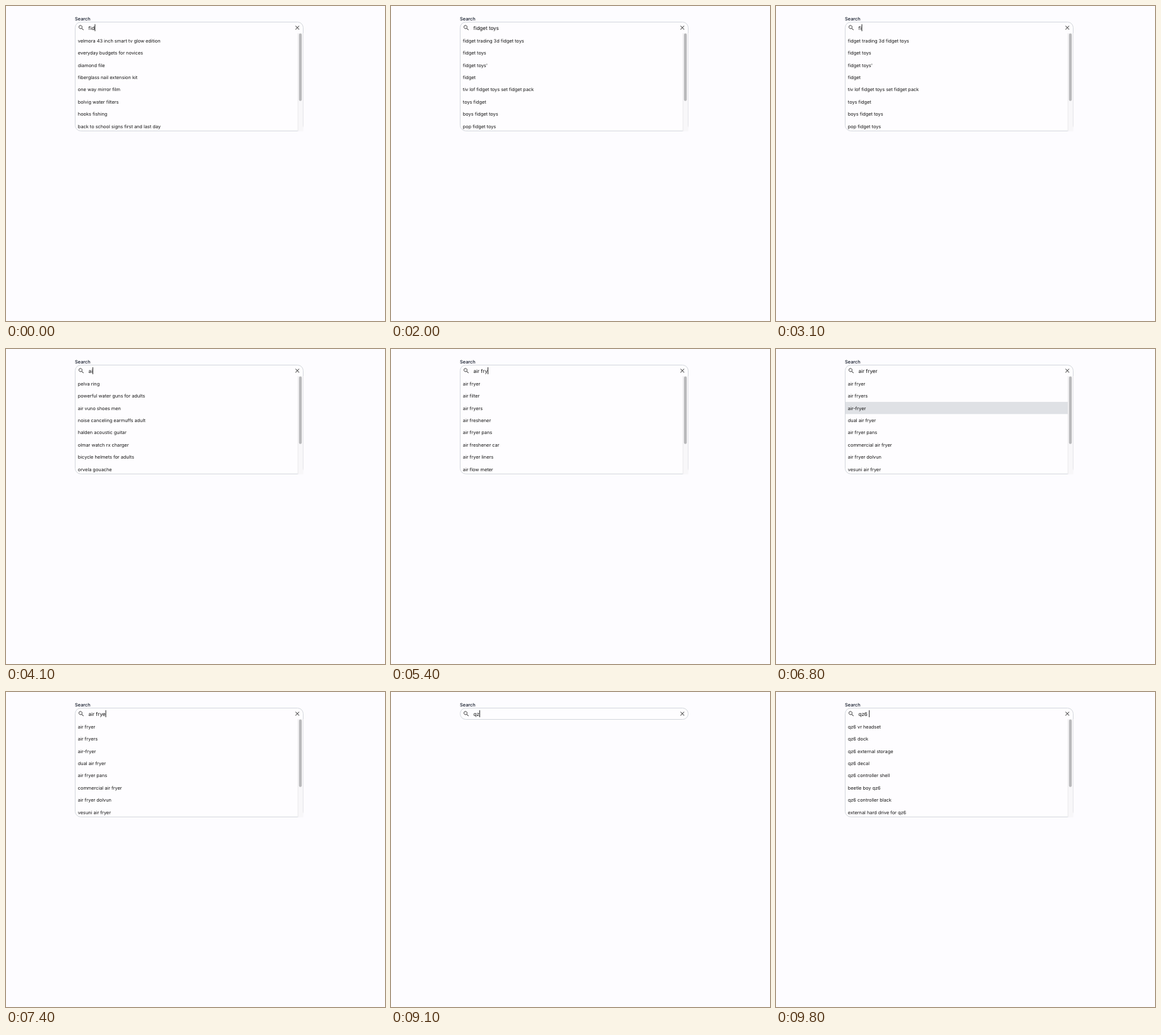
An HTML page for the animation above (10000 ms loop, 600x500 px).

```html
<!DOCTYPE html>
<html lang="en">
<head>
<meta charset="utf-8">
<title>Search suggestions</title>
<style>
  html, body { margin: 0; width: 100%; height: 100%; overflow: hidden; background: #fdfcff; }
  svg { display: block; width: 600px; height: 500px; }
  text { font: 400 7.37px Inter, sans-serif; fill: #151515; white-space: pre; text-rendering: geometricPrecision; }
  #label { font-weight: 500; fill: #111827; }
  #query { font-size: 8.06px; fill: #0c0c0c; }
  .icon { fill: #4a4a4a; }
</style>
</head>
<body>
<svg viewBox="0 0 600 500">
  <defs><clipPath id="inside"><rect x="110" y="44" width="352" height="154"/></clipPath></defs>
  <text id="label" x="109" y="23.2">Search</text>
  <rect id="box" x="109.5" y="25.5" width="361" height="18" rx="9" fill="#fefdff" stroke="#cfd3d9" stroke-width=".9"/>
  <g id="panel">
    <g clip-path="url(#inside)">
      <rect id="highlight" x="110" width="352" height="19.36" fill="#dfe1e5"/>
      <g id="rows"></g>
    </g>
    <rect x="462" y="43" width="8.6" height="155.8" fill="#f8f7f9"/>
    <path d="M462.2 43V198.5M470.4 43V191" stroke="#e3e3e6" stroke-width=".6"/>
    <rect x="463.8" y="43.5" width="4.4" height="107.3" rx="2.2" fill="#b9b9bb"/>
  </g>
  <path class="icon" transform="translate(113.6 29) scale(.4607)" d="M15.5 14h-.79l-.28-.27A6.5 6.5 0 1 0 13.73 14.43l.27.28v.79l5 4.99L20.49 19zM9.5 14A4.5 4.5 0 1 1 9.5 5A4.5 4.5 0 1 1 9.5 14z" fill-rule="evenodd"/>
  <path id="clear" class="icon" transform="translate(455.7 28.9) scale(.4607)" d="M19 6.41L17.59 5 12 10.59 6.41 5 5 6.41 10.59 12 5 17.59 6.41 19 12 13.41 17.59 19 19 17.59 13.41 12z"/>
  <text id="query" x="130.5" y="37.5"></text>
  <rect id="caret" y="29" width=".9" height="11" fill="#111"/>
</svg>
<script>
const LOOP = 10000, BLINK = 500, PITCH = 19.36;
const $ = id => document.getElementById(id);

const lists = {
  fid: ['velmora 43 inch smart tv glow edition', 'everyday budgets for novices', 'diamond file',
    'fiberglass nail extension kit', 'one way mirror film', 'bolvig water filters', 'hooks fishing',
    'back to school signs first and last day'],
  toys: ['fidget trading 3d fidget toys', 'fidget toys', "fidget toys'", 'fidget',
    'tiv lof fidget toys set fidget pack', 'toys fidget', 'boys fidget toys', 'pop fidget toys'],
  a: ['pelva ring', 'powerful water guns for adults', 'air vuno shoes men', 'noise canceling earmuffs adult',
    'halden acoustic guitar', 'olmar watch rx charger', 'bicycle helmets for adults', 'orvela gouache'],
  air: ['air mattress', 'air purifier', 'air fryer', 'air pump', 'air conditioner', 'air freshener',
    'air hockey table', 'air compressor tank'],
  airf: ['air fryer', 'air filter', 'air fryers', 'air freshener', 'air fryer pans', 'air freshener car',
    'air fryer liners', 'air flow meter'],
  fryer: ['air fryer', 'air fryers', 'air-fryer', 'dual air fryer', 'air fryer pans', 'commercial air fryer',
    'air fryer dolvun', 'vesuni air fryer'],
  console: ['qz6 vr headset', 'qz6 dock', 'qz6 external storage', 'qz6 decal', 'qz6 controller shell',
    'beetle boy qz6', 'qz6 controller black', 'external hard drive for qz6']
};
lists.fidget = [...lists.toys].sort();

// time, typed text, suggestion list, highlighted row
const steps = [
  [0, 'fid', 'fid'], [200, 'fidg', 'fid'], [400, 'fidge', 'fid'], [500, 'fidget', 'fid'],
  [800, 'fidget', 'fidget'], [1000, 'fidget ', 'fidget'],
  [1300, 'fidget t', 'fidget'], [1400, 'fidget toy', 'fidget'], [1500, 'fidget toys', 'fidget'],
  [1600, 'fidget toys', 'toys'],
  [2500, 'fidget toy', 'toys'], [2600, 'fidget to', 'toys'], [2700, 'fidget ', 'toys'],
  [2800, 'fidget', 'toys'], [2900, 'fidg', 'toys'], [3000, 'fi', 'toys'], [3200, ''],
  [3700, 'a'], [3900, 'ai'], [4100, 'ai', 'a'], [4200, 'air', 'a'], [4400, 'air ', 'a'], [4600, 'air ', 'air'],
  [4800, 'air f', 'air'], [4900, 'air fr', 'airf'],
  [5400, 'air fry', 'airf'], [5700, 'air fry', 'fryer'], [5800, 'air frye', 'fryer'], [6000, 'air fryer', 'fryer'],
  [6500, 'air fryer', 'fryer', 0], [6600, 'air fryer', 'fryer', 1],
  [6800, 'air fryer', 'fryer', 2], [7100, 'air fryer', 'fryer', 3],
  [7400, 'air frye', 'fryer'], [7500, 'air fry', 'fryer'], [7600, 'air fr', 'fryer'],
  [7700, 'air f', 'fryer'], [7800, 'air ', 'airf'], [8000, 'air', 'air'], [8300, 'a', 'a'], [8400, ''],
  [8800, 'q'], [9100, 'qz'], [9200, 'qz6'], [9300, 'qz6', 'console'], [9800, 'qz6 ', 'console']
];

const rows = lists.fid.map((_, i) => {
  const row = document.createElementNS('http://www.w3.org/2000/svg', 'text');
  row.setAttribute('x', 113.8);
  row.setAttribute('y', 58 + i * PITCH);
  return $('rows').appendChild(row);
});
const show = (id, on) => $(id).setAttribute('visibility', on ? 'visible' : 'hidden');

let shown = -1;
function showStep(index) {
  const [, typed, list, row] = steps[index];
  $('query').textContent = typed;
  $('caret').setAttribute('x', 130.6 + (typed ? $('query').getComputedTextLength() : 0));
  $('panel').style.display = list ? '' : 'none';
  $('box').setAttribute('height', list ? 172.8 : 18);
  if (list) rows.forEach((el, i) => el.textContent = lists[list][i]);
  show('highlight', row !== undefined);
  $('highlight').setAttribute('y', 45.2 + (row || 0) * PITCH);
  show('clear', typed);
}

function draw() {
  const t = performance.now() % LOOP;
  const index = steps.findLastIndex(step => step[0] <= t);
  if (index !== shown) showStep(shown = index);
  let key = index;
  while (key > 0 && steps[key - 1][1] === steps[key][1]) key--;
  show('caret', (t - steps[key][0]) % (2 * BLINK) < BLINK);
  requestAnimationFrame(draw);
}
draw();
</script>
</body>
</html>
```
